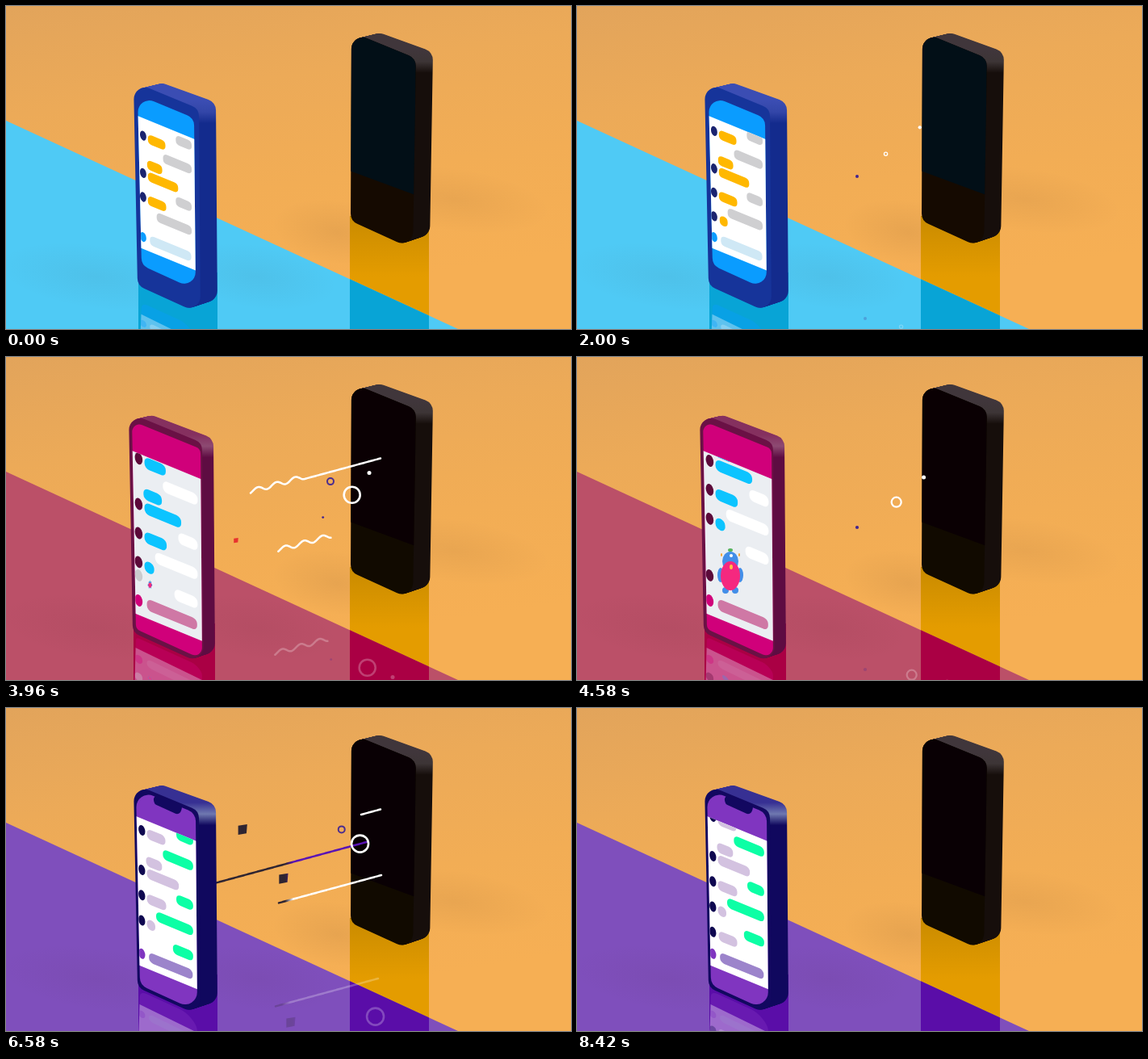
Write an HTML page with a canvas that moves like this. It is 700 by 400 pixels and loops after 8750 ms.

```html
<!DOCTYPE html>
<html lang="en">
<head>
<meta charset="utf-8">
<style>
  html, body { margin: 0; width: 100%; height: 100%; overflow: hidden; }
  canvas { display: block; }
</style>
</head>
<body>
<canvas id="stage" width="700" height="400"></canvas>
<script>
const ctx = document.getElementById('stage').getContext('2d');
const LOOP = 8750, SCENE = LOOP / 3;
const SLOPE = 0.41, PATH = 0.271;

// Four corners of an upright panel seen from the side
const face = (x, y, w, h, lean = 2) =>
  [x, y, x + w, y + SLOPE * w, x + w + lean, y + h + 0.44 * w, x + lean + 3, y + h];

const tall = face(158, 94, 81, 252), farFront = face(428, 32, 80, 234, -4);

const themes = [
  {
    floor: '#4fcaf5', mirror: '#08a4d6', frame: '#16349a', side: '#132b8d', top: '#3b4db3', glint: '#3346a8',
    accent: '#0a9cff', paper: '#fff', avatar: '#1b2470', received: '#ffb800', sent: '#cfcfd1', input: '#cfe8f5',
    beam: '#4ab6e8', glass: '#020f17', chin: '#150a01',
    front: tall, depth: 21, radius: 14, screen: [163, 110, 70, 211], header: 26, footer: 23,
    chatY: 0, newest: 1, replyAt: 1800, replyTime: 190
  },
  {
    floor: '#bb5068', mirror: '#aa0044', frame: '#6a1145', side: '#5e0c42', top: '#85305f', glint: '#8d4a72',
    accent: '#d0007a', paper: '#ebeef2', avatar: '#5c0a3a', received: '#0cc4ff', sent: '#fff', input: '#cf78a5',
    beam: '#e8322e', glass: '#0a0003', chin: '#110a00',
    front: face(152, 69, 91, 272), depth: 14, radius: 9, screen: [156, 79, 85, 258], header: 37, footer: 21,
    chatY: -67.7, newest: 0, replyAt: 1000, replyTime: 450, sticker: true
  },
  {
    floor: '#7f4fbc', mirror: '#5a0da8', frame: '#120860', side: '#10085e', top: '#373093', glint: '#6f78b0',
    accent: '#8035c0', paper: '#fff', avatar: '#0f0850', received: '#d3c2e0', sent: '#0cffa5', input: '#9c84cb',
    beam: '#5a14b4', glass: '#090004', chin: '#110a00',
    front: tall, depth: 21, radius: 15, screen: [161, 100, 74, 243], header: 34, footer: 26,
    chatY: -18.3, newest: 0, replyAt: 1800, replyTime: 190, dark: '#2f2531'
  }
];

// Bubble widths, newest turn first
const receivedWidths = [22, 10, 23, 38, 22], sentWidths = [24, 44, 20, 36, 20];

const ramp = (t, from, to, power = 1) => Math.min(1, Math.max(0, (t - from) / (to - from))) ** power;
const easeOut = (t, from, to) => 1 - (1 - ramp(t, from, to)) ** 2;
const smooth = (t, from, to) => { const u = ramp(t, from, to); return u * u * (3 - 2 * u); };

function roundPoly(p, r) {
  const n = p.length;
  ctx.beginPath();
  ctx.moveTo((p[n - 2] + p[0]) / 2, (p[n - 1] + p[1]) / 2);
  for (let i = 0; i < n; i += 2) ctx.arcTo(p[i], p[i + 1], p[(i + 2) % n], p[(i + 3) % n], r);
  ctx.closePath();
}

function fillPoly(p, color, r = 0) {
  roundPoly(p, r);
  ctx.fillStyle = color;
  ctx.fill();
}

function ellipse(x, y, rx, ry, color) {
  ctx.beginPath();
  ctx.ellipse(x, y, rx, ry, 0, 0, 7);
  ctx.fillStyle = color;
  ctx.fill();
}

function gradient(x0, y0, x1, y1, ...colors) {
  const g = ctx.createLinearGradient(x0, y0, x1, y1);
  colors.forEach((color, i) => g.addColorStop(i / (colors.length - 1), color));
  return g;
}

function shadow(x, y, rx, ry, alpha) {
  ctx.save();
  ctx.transform(rx, rx * 0.12, 0, ry, x, y);
  const g = ctx.createRadialGradient(0, 0, 0, 0, 0, 1);
  g.addColorStop(0, `rgba(60,30,20,${alpha})`);
  g.addColorStop(1, 'rgba(60,30,20,0)');
  ellipse(0, 0, 1, 1, g);
  ctx.restore();
}

// Phone body: the front panel pushed back step by step
function slab({ front, depth, top, glint, side, frame }) {
  const y = front[3], steps = 20;
  ctx.fillStyle = gradient(0, y - 10, 0, y + 18, top, glint, side);
  for (let i = steps; i > 0; i--) {
    const d = depth * i / steps;
    roundPoly(front.map((v, j) => v + d * (j % 2 === 0 ? 1 : j > 1 && j < 6 ? -0.38 : -0.19)), 14);
    ctx.fill();
  }
  fillPoly(front, frame, 14);
}

function pill(x, y, width, color) {
  ctx.beginPath();
  ctx.roundRect(x, y - 6, width, 12, 5);
  ctx.fillStyle = color;
  ctx.fill();
}

const avatar = (y, color) => ellipse(7, y, 4, 6, color);

function drawSticker(size) {
  const blue = '#438ee8';
  ctx.save();
  ctx.translate(176, 285);
  ctx.scale(size, size);
  ellipse(14, -46, 3, 2, '#55b45b');
  for (const side of [-1, 1]) {
    ellipse(14 + side * 12, -15, 4, 9, blue);
    ellipse(14 + side * 6, 4, 4, 4, blue);
    ellipse(14 + side * 11, -40, 1, 2, '#f5a02a');
  }
  ellipse(14, -32, 10, 12, blue);
  ellipse(14, -14, 12, 18, '#f5287f');
  ellipse(15, -39, 2, 2, '#fff');
  ellipse(15, -25, 2, 3, '#ffbf45');
  ctx.restore();
}

function drawChat(th, t, top, bottom) {
  const inputY = bottom - 15, restY = inputY - 26;
  const row = i => 297 - 30 * i;
  const progress = smooth(t, th.replyAt, th.replyAt + th.replyTime);
  const answered = progress > (th.sticker ? 0.9 : 0);
  const scroll = progress * (th.sticker ? 46 : row(th.newest) - restY);

  ctx.beginPath();
  ctx.rect(-5, top, 100, bottom - top);
  ctx.fillStyle = th.paper;
  ctx.fill();
  ctx.clip();
  avatar(inputY, th.accent);
  pill(15.5, inputY + 0.5, 52, th.input);

  ctx.translate(0, -scroll);
  for (let i = th.newest; i < 5; i++) {
    const y = row(i) - (i > 3 ? 17 : 0);
    pill(68 - sentWidths[i], row(i) - 12 - (i > 2 ? 17 : 0), sentWidths[i], th.sent);
    if (i === th.newest) continue;
    avatar(y, th.avatar);
    pill(13, y + 1.5, receivedWidths[i], th.received);
  }
  pill(12, row(3) - 13, 19, th.received);

  const replyY = th.sticker ? restY + scroll : row(th.newest);
  if (answered && !th.sticker) pill(14, replyY + 1.5, receivedWidths[th.newest] * progress, th.received);
  ctx.globalAlpha *= ramp(t, 850, 1043);
  avatar(replyY, answered ? th.avatar : '#cbcbce');
}

function drawScreen(th, t) {
  const [x, y, w, h] = th.screen, s = w / 71;
  const toChat = v => (v - th.chatY) / s;
  ctx.save();
  roundPoly(face(...th.screen), th.radius);
  ctx.clip();
  ctx.fillStyle = th.accent;
  ctx.fillRect(100, 50, 200, 350);
  ctx.save();
  ctx.transform(s, s * SLOPE, 0, s, x, th.chatY);
  drawChat(th, t, toChat(y + th.header), toChat(y + h - th.footer));
  ctx.restore();
  if (th.sticker) drawSticker(ramp(t, th.replyAt - 40, th.replyAt + th.replyTime));
  ctx.restore();
  if (th.dark) fillPoly([x + 20, y + 5, x + 58, y + 21, x + 54, y + 33, x + 23, y + 19], th.frame, 5);
}

function drawFloor(th, t) {
  ctx.fillStyle = gradient(0, 0, 60, 400, '#e2a45b', '#ecaa58', '#f2ad55', '#f6af54');
  ctx.fillRect(0, 0, 700, 400);
  shadow(555, 240, 120, 40, 0.06);
  shadow(410, 280, 80, 40, 0.07);

  ctx.fillStyle = gradient(0, 265, 0, 335, '#cb8c00', '#e49c00');
  ctx.fillRect(426, 260, 98, 140);

  ctx.save();
  fillPoly([0, 142, 560, 400, 0, 400], th.floor);
  ctx.clip();
  shadow(110, 335, 120, 40, 0.05);
  shadow(310, 335, 100, 40, 0.05);

  // Mirror images, partly hidden by the phones
  const [, , , , rightX, rightY, leftX, leftY] = th.front;
  ctx.fillStyle = th.mirror;
  ctx.fillRect(426, 260, 98, 140);
  ctx.fillRect(leftX + 1, 330, rightX + th.depth - leftX - 1, 70);
  const k = 0.7, tilt = (rightY - leftY) / (rightX - leftX);
  ctx.globalAlpha = 0.35;
  ctx.transform(1, (1 + k) * tilt, 0, -k, 0, (1 + k) * (leftY - tilt * leftX));
  drawScreen(th, t);
  ctx.restore();
}

function drawFarPhone(th) {
  slab({ front: farFront, depth: 21, top: '#40363b', glint: '#3d3536', side: '#160e0b', frame: th.chin });
  ctx.save();
  roundPoly(farFront, 14);
  ctx.clip();
  fillPoly([420, 20, 508, 20, 507, 234, 420, 202], th.glass);
  ctx.restore();
}

// In the dark theme everything changes colour at the middle
const tone = (th, color) => th.dark ? gradient(346, 0, 356, 0, th.dark, color) : color;

// A line that shoots left along its path, then is pulled in from behind
function stream(th, t, { x, y, end, start, bend = 0, pull = 425, power = 2, color = '#fff' }) {
  const arrive = start + 325, length = x - end;
  const head = x - length * easeOut(t, start, arrive);
  const tail = x - length * ramp(t, arrive, arrive + pull, power);
  if (tail - head < 0.5) return;
  ctx.beginPath();
  for (let px = tail; px > head; px--) {
    const wave = px < bend && !th.dark ? 2.8 * (1 - Math.cos((bend - px) * Math.PI * 2 / 23)) : 0;
    ctx.lineTo(px, y + (x - px) * PATH - wave);
  }
  ctx.lineWidth = 2.5;
  ctx.lineCap = 'round';
  ctx.strokeStyle = tone(th, color);
  ctx.stroke();
}

function cube(th, t, x, y, start) {
  const gone = Math.max(0, (t - start) / 53) ** 2;
  const h = 5.6 * ramp(t, start - 200, start) * (1 - ramp(t, 747, 1330)), lean = h * 0.16;
  x -= gone;
  y += gone * PATH;
  if (x > 240)
    fillPoly([x - h, y - h + lean, x + h, y - h - lean, x + h - lean, y + h - lean, x - h, y + h + lean], tone(th, th.beam));
}

// A disc or ring that pops up, drifts down the path and shrinks
function bubble(t, { x, y, drift, r, born, shrink, dies, color, line }) {
  const size = r * ramp(t, born, born + 180) * (1 - ramp(t, shrink, dies, 2));
  if (size <= 0) return;
  ctx.beginPath();
  ctx.arc(x - drift, y + drift * PATH, size, 0, 7);
  ctx.lineWidth = line * Math.min(1, 0.3 + size / r);
  ctx.strokeStyle = ctx.fillStyle = color;
  line ? ctx.stroke() : ctx.fill();
}

// Draws a part and its faint image in the floor
function mirrored(dx, dy, draw) {
  draw();
  ctx.save();
  ctx.globalAlpha = 0.25;
  ctx.translate(dx, dy);
  draw();
  ctx.restore();
}

function drawSignals(th, t) {
  stream(th, t, { x: 464, y: 161.3, end: 255, start: 95, pull: 620, power: 4, color: th.beam });
  mirrored(-4, 128, () => stream(th, t, { x: 465, y: 207, end: 337, start: 422, bend: 426.5 }));
  stream(th, t, { x: 464, y: 125.5, end: 302, start: 722, bend: 369.5 });

  cube(th, t, 380, 127, 254);
  mirrored(9, 178, () => cube(th, t, 350, 209.5, 617));

  mirrored(19, 214, () => bubble(t, { x: 440, y: 167.7, drift: 60 * smooth(t, 600, 2200),
    r: 10.5, born: 350, shrink: 747, dies: 2150, color: '#fff', line: 2.6 }));
  bubble(t, { x: 419, y: 149.5, drift: 45 * ramp(t, 600, 1450, 1.5),
    r: 4, born: 400, shrink: 1043, dies: 1450, color: '#4b2d8f', line: 2 });
  mirrored(29, 253, () => bubble(t, { x: 459, y: 141, drift: 35 * easeOut(t, 860, 2200),
    r: 2.5, born: 860, shrink: 1663, dies: 2550, color: '#fff', line: 0 }));
  mirrored(10, 176, () => bubble(t, { x: 395, y: 198, drift: 48 * smooth(t, 950, 1663),
    r: 2.1, born: 920, shrink: 1900, dies: 2400, color: '#43248f', line: 0 }));
}

function render() {
  const now = performance.now() % LOOP;
  const th = themes[Math.floor(now / SCENE)], t = now % SCENE;
  drawFloor(th, t);
  drawFarPhone(th);
  drawSignals(th, t);
  slab(th);
  drawScreen(th, t);
  requestAnimationFrame(render);
}
render();
</script>
</body>
</html>
```
